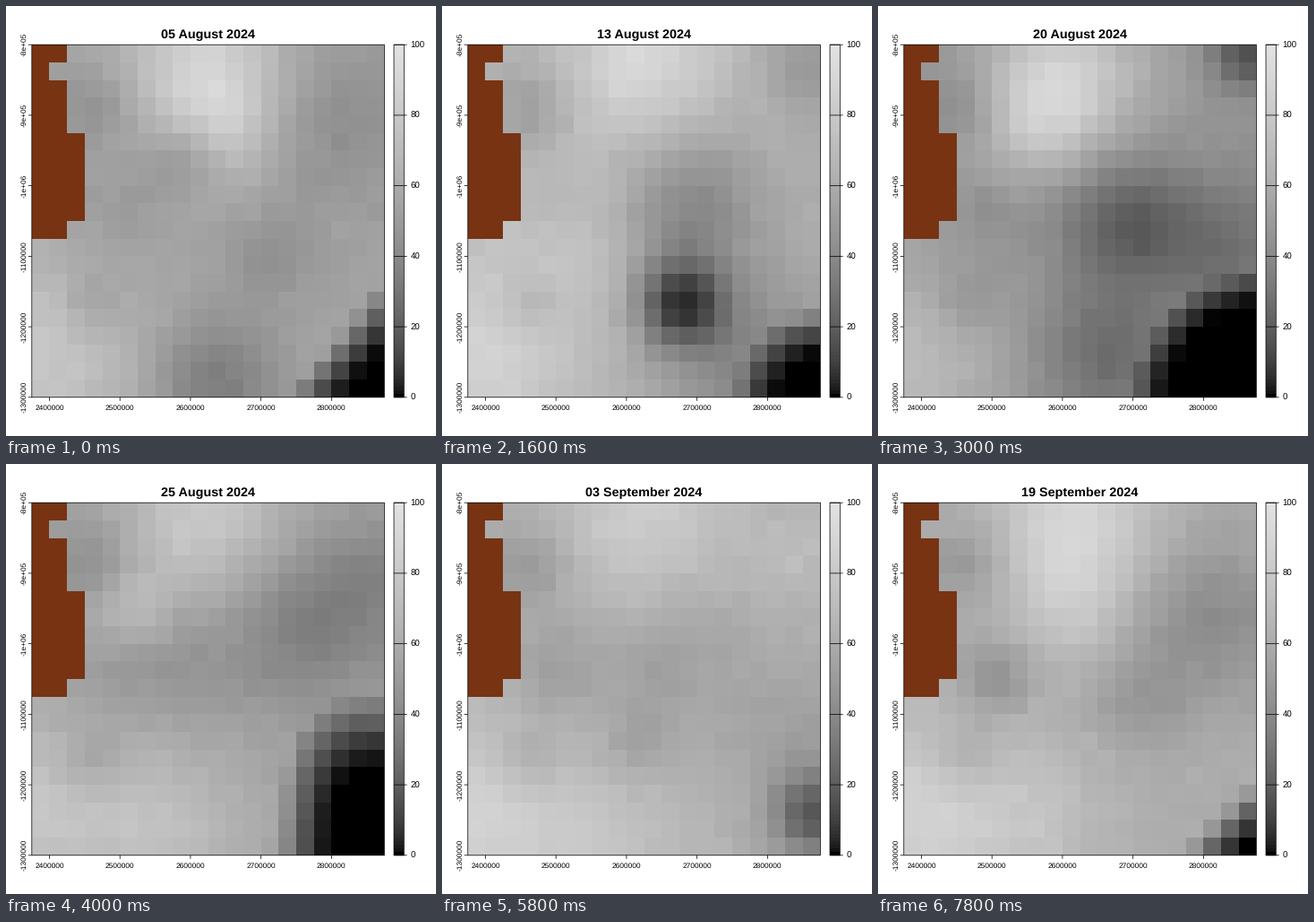
Recreate the animation shown at these times as a matplotlib script. Size 480x480 px, loop 8 s.

```python
import numpy as np
import matplotlib.pyplot as plt
from matplotlib.animation import FuncAnimation
from matplotlib.patches import Rectangle

SIZE, DPI = 480, 80
FRAMES, INTERVAL = 40, 200
N = 20                                   # cells per side
LEFT, RIGHT, TOP, BOTTOM = 28.8, 422.4, 43.2, 436.8
BAR_L, BAR_R = 433, 444.3
CELL = (RIGHT - LEFT) / N
LAND = (120, 51, 18)
WHITEST = 226

plt.rcParams["font.family"] = ["Liberation Sans"]
plt.rcParams["text.hinting"] = "none"
row, col = np.mgrid[:N, :N]

land = (col < 2) & (row < 11) | (col == 2) & (row >= 5) & (row <= 9)
land[1, 1] = False


def blob(c, r, radius, amount):
    return amount * np.exp(-((col - c) ** 2 + (row - r) ** 2) / radius ** 2)


def sea(base, water, *blobs):
    """Ice grey: base plus blobs, fading to open water in the lower right corner.

    water = width, height, roundness and fade of the open corner, in cells.
    """
    w, h, power, fade = water
    reach = ((abs(col - N) / w) ** power + (abs(row - N) / h) ** power) ** (1 / power)
    ice = base + coast + sum(blob(*b) for b in blobs)
    return ice * np.clip((reach - 1) / fade, 0, 1)


# shapes that stay all season: bright north and south-west, dark inlets
coast = (blob(9.3, 0.5, 4.8, 40) + blob(0, 17, 6, 36) + blob(3, 3, 2.2, -22)
         + blob(4.5, 9, 2.5, -12) + blob(3, 14, 2, -18))
CLOSED = (0.5, 0.5, 1, 0.8)

season = {
    0: sea(163, (3.3, 3.9, 1, 1), (10.5, 4, 3.5, 28), (16.5, 4, 4.5, -22),
           (10, 18.5, 3.5, -38), (8, 6, 2.2, -25), (13, 11.5, 2.5, -18)),
    8: sea(175, (3, 3, 2, 0.85), (11.7, 14.2, 2.3, -118), (12, 9, 4, -42),
           (16, 18, 5, -42), (5.5, 10, 4.5, 22), (19, 1, 2.5, -22)),
    15: sea(150, (5.7, 5.8, 2, 0.35), (7, 3.5, 4, 42), (12, 9.5, 3.5, -55),
            (11, 17, 4, -42), (17.5, 11, 4, -38), (19, 0, 2, -70)),
    20: sea(160, (3.6, 5.5, 3, 0.8), (5, 5.5, 2.5, 22), (15, 6.5, 4.2, -32),
            (19, 4, 3.5, -22), (8, 18, 4.8, 24), (8.5, 8.5, 3, -12)),
    25: sea(160, CLOSED, (18, 2.5, 4, 24), (12.5, 8, 4.5, -22),
            (9, 13, 2, -32), (8, 19.5, 5, 32), (19.5, 17, 2.4, -80)),
    33: sea(188, CLOSED, (9.3, 0.5, 4.8, -20), (4, 9, 3.5, -12),
            (10.2, 9, 2, -16), (19, 17.3, 2.2, -95), (18.5, 13, 3.5, -28)),
    45: sea(172, (2, 2, 1, 1.7), (9, 5.5, 3.5, 20), (17, 6, 4.5, -32),
            (13, 10.5, 2.8, -18), (4.7, 9.5, 1.8, -20), (7, 17.5, 4.5, 16)),
}
days = list(season)


def day_of(frame):
    return frame if frame < 37 else frame + 6     # six days have no picture


def title_of(day):
    date = str(np.datetime64("2024-08-05") + day)
    month = "August" if date[5:7] == "08" else "September"
    return f"{date[8:]} {month} {date[:4]}"


def cell_index(start, stop):
    """Cell under each pixel centre between two edges."""
    pixels = np.arange(round(start), round(stop))
    return ((pixels + 0.5 - start) / CELL).astype(int)


pick = np.ix_(cell_index(TOP, BOTTOM), cell_index(LEFT, RIGHT))


def picture(day):
    k = min(np.searchsorted(days, day, side="right"), len(days) - 1)
    a, b = days[k - 1], days[k]
    t = (day - a) / (b - a)
    grey = (1 - t) * season[a] + t * season[b]
    grain = np.random.default_rng(100 + day).normal(0, 1.5, (N, N))
    grey = np.clip(grey + grain * (grey > 5), 0, WHITEST)
    rgb = np.stack([grey] * 3, axis=2)
    rgb[land] = LAND
    return rgb.round().astype(np.uint8)[pick]


fig = plt.figure(figsize=(SIZE / DPI, SIZE / DPI), dpi=DPI, facecolor="white")
ax = fig.add_axes([0, 0, 1, 1])
ax.axis("off")


def pt(px):
    return px * 72 / DPI


def line(xs, ys):
    ax.plot(xs, ys, color="black", lw=pt(0.75), solid_capstyle="butt",
            snap=False, zorder=3)


def label(x, y, text, px, **kw):
    return ax.text(x, y, text, fontsize=pt(px), color="black", va="baseline", **kw)


def raster(pixels, x0, x1):
    return ax.imshow(pixels, extent=(round(x0), round(x1), round(BOTTOM), round(TOP)),
                     interpolation="nearest", aspect="auto")


def outline(x0, x1):
    ax.add_patch(Rectangle((x0, TOP), x1 - x0, BOTTOM - TOP, fill=False,
                           ec="black", lw=pt(0.75), snap=False, zorder=3))


sea_map = raster(picture(0), LEFT, RIGHT)
ramp = WHITEST * np.linspace(1, 0, 100) ** 0.54
raster(np.stack([ramp[:, None]] * 3, axis=2).round().astype(np.uint8), BAR_L, BAR_R)
outline(LEFT, RIGHT)
outline(BAR_L, BAR_R)

for i in range(5):
    x = LEFT + CELL * (1 + 4 * i)
    line([x, x], [BOTTOM, BOTTOM + 4])
    label(x, 451, str(2400000 + 100000 * i), 8.4, ha="center")

for i in range(6):
    y = TOP + CELL * 4 * i
    north = f"-{8 + i}e+05" if i < 2 else "-1e+06" if i == 2 else f"-{8 + i}00000"
    line([LEFT - 4, LEFT], [y, y])
    label(23, y, north, 8.4, rotation=90, rotation_mode="anchor", ha="center")
    line([BAR_L, BAR_R + 3.3], [y, y])
    label(451.5, y + 3.4, str(100 - 20 * i), 9.6, ha="left")

title = label(225.6, 36, title_of(0), 14.4, weight="bold", ha="center")
ax.set_xlim(0, SIZE)
ax.set_ylim(SIZE, 0)


def update(frame):
    day = day_of(frame)
    sea_map.set_data(picture(day))
    title.set_text(title_of(day))
    return sea_map, title


anim = FuncAnimation(fig, update, frames=FRAMES, interval=INTERVAL,
                     repeat=True, repeat_delay=0, blit=False)
plt.show()
```
